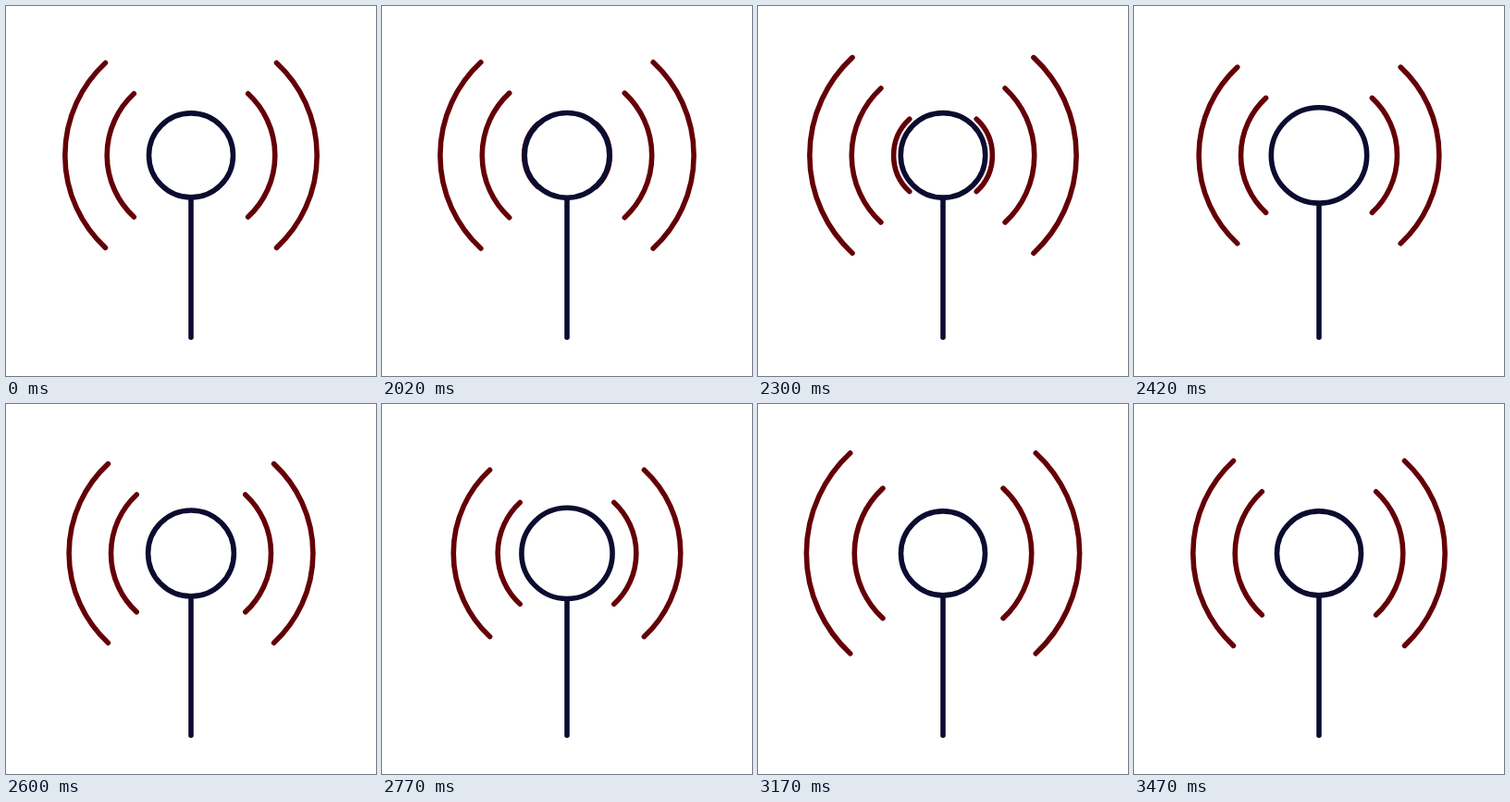
Recreate the animation shown at these times as an HTML page. Size 400x400 px, loop 3500 ms.

```html
<!DOCTYPE html>
<html lang="en">
<head>
<meta charset="utf-8">
<title>Signal</title>
<style>
  html, body { margin: 0; width: 100%; height: 100%; overflow: hidden; background: #fff; }
  svg { display: block; width: 100%; height: 100%; }
  svg * { stroke-width: 5.58; stroke-linecap: round; }
  #waves path { fill: none; stroke: #640006; }
  .mast { fill: #fff; stroke: #0c0c30; }
</style>
</head>
<body>
<svg viewBox="0 0 400 400">
  <g id="waves"></g>
  <path class="mast" d="M200 207V358.2"/>
  <circle class="mast" id="head" cx="200" cy="161.4" r="45.5"/>
</svg>
<script>
const LOOP = 3500, START = 2000, HOLD = 2020;
const CX = 200, CY = 161.4, STEP = 45.4, HEAD = 45.5;
const PULSE = 283, PULSES = 4, SWELL = 6.2;
const HALF = 47.2 * Math.PI / 180;

// [ms, value, slope per second]
const TRAVEL = [
  [0, 0, 0.6], [170, 0.505, 4.6], [420, 1.855, 5.8], [600, 2.9, 5.5],
  [970, 4.07, 1], [1080, 4.13, 0], [1440, 4, 0]
];
const LEAD = [[600, 0, 0], [970, 0.155, 0.3], [1080, 0.17, 0], [1440, 0, 0]];

function curve(keys, t) {
  if (t <= keys[0][0]) return keys[0][1];
  for (let i = 1; i < keys.length; i++) {
    const [t0, a, va] = keys[i - 1], [t1, b, vb] = keys[i];
    if (t > t1) continue;
    const d = (t1 - t0) / 1000, s = (t - t0) / (t1 - t0), r = 1 - s;
    return a + (b - a) * s * s * (3 - 2 * s) + va * d * s * r * r - vb * d * s * s * r;
  }
  return keys[keys.length - 1][1];
}

const head = document.getElementById("head");
const group = document.getElementById("waves");

// Each wave starts at the head; slot counts steps already travelled at rest.
const waves = [2, 1, 0, -1, -2, -3].map(slot => {
  const path = document.createElementNS("http://www.w3.org/2000/svg", "path");
  group.append(path);
  return { slot, path, limit: slot === 2 ? 2.5 : 2.57 };
});

function arcs(r) {
  const x = r * Math.cos(HALF), y = r * Math.sin(HALF);
  const side = (dir, sweep) =>
    `M${CX + dir * x} ${CY - y}A${r} ${r} 0 0 ${sweep} ${CX + dir * x} ${CY + y}`;
  return side(-1, 0) + side(1, 1);
}

function draw(time) {
  const t = time % LOOP;
  const u = t < HOLD ? 0 : t - START;
  const travel = curve(TRAVEL, u);
  const swell = u < PULSE * PULSES ? (1 - Math.cos(2 * Math.PI * u / PULSE)) / 2 : 0;
  head.setAttribute("r", HEAD + SWELL * swell);
  for (const { slot, path, limit } of waves) {
    const p = travel + slot + (slot === -2 ? curve(LEAD, u) : 0);
    path.setAttribute("d", p > 0 && p < limit ? arcs(STEP * (1 + p)) : "");
  }
}

const begin = performance.now();
function tick() {
  draw(performance.now() - begin);
  requestAnimationFrame(tick);
}
tick();
</script>
</body>
</html>
```
